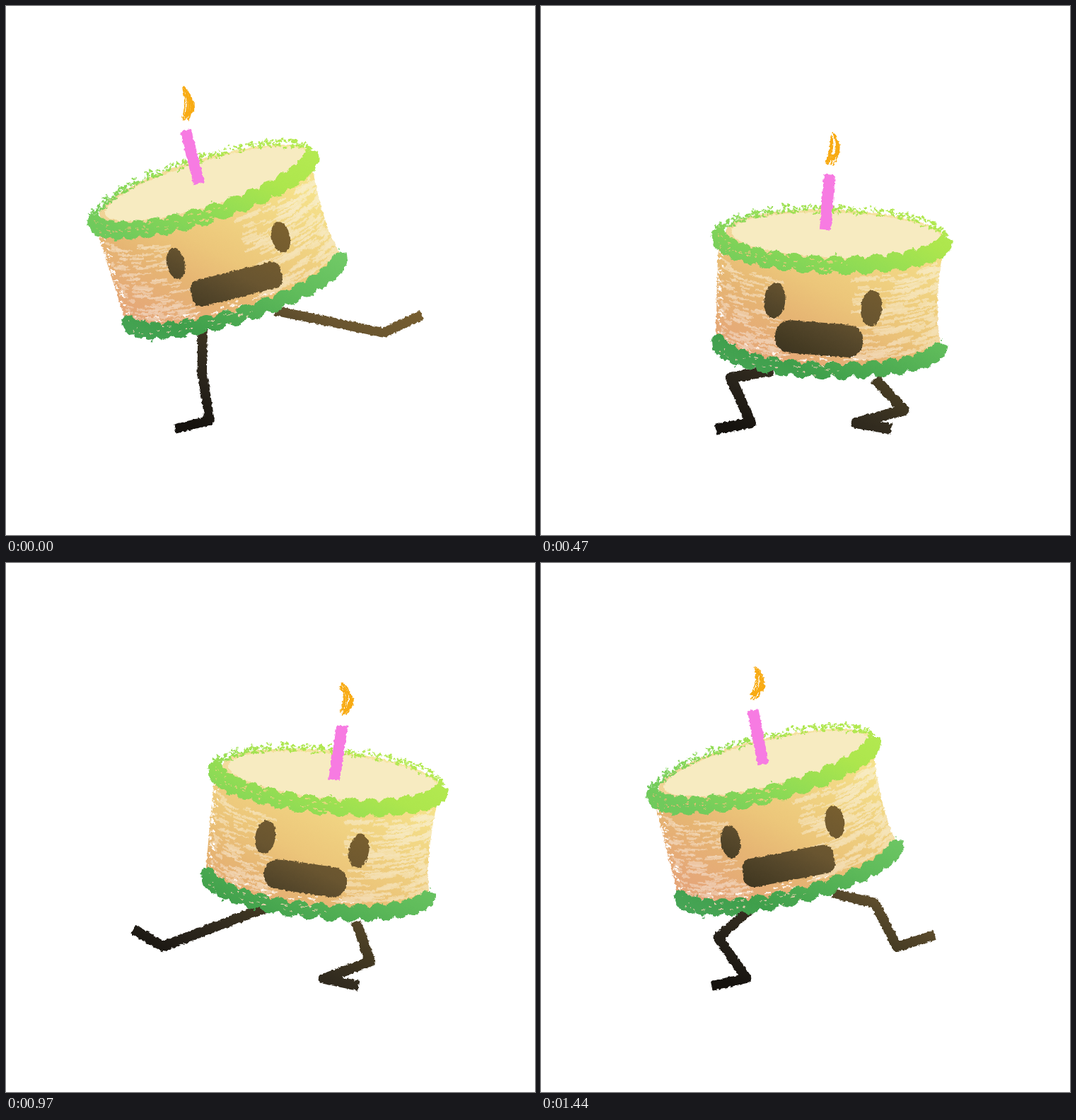
Write an HTML page with a canvas that moves like this. It is 748x748 px and loops after 1540 ms.

```html
<!DOCTYPE html>
<html lang="en">
<head>
<meta charset="utf-8">
<title>Dancing cake</title>
<style>
html, body { margin: 0; height: 100%; overflow: hidden; background: #fff; }
canvas { display: block; width: 100vw; height: 100vh; filter: url(#chalk); }
svg { position: absolute; width: 0; height: 0; }
</style>
</head>
<body>
<canvas id="stage" width="748" height="748"></canvas>
<svg>
  <filter id="chalk" x="0" y="0" width="100%" height="100%" color-interpolation-filters="sRGB">
    <feTurbulence type="fractalNoise" baseFrequency=".22" numOctaves="2" seed="4"/>
    <feDisplacementMap in="SourceGraphic" scale="4.5" xChannelSelector="R" yChannelSelector="G"/>
  </filter>
</svg>
<script>
const g = document.getElementById('stage').getContext('2d');
const { sin, cos, PI, abs, max, sqrt, hypot } = Math;

const LOOP = 1540;
// The dance is one sway: time, then -1 (far left) to 1 (far right)
const SWAY = [[0, -1], [300, 0], [470, .32], [770, 1], [970, .6], [1170, 0], [1440, -.76], [LOOP, -1]];
// Each leg kicks along a curve to a peak, ending with its own foot direction
const LEGS = [
  { side: -1, via: [165, 560], peak: [240, 397], foot: [-37, -48] },
  { side: 1, via: [490, 605], peak: [534, 462], foot: [54, -25] }
];

const mix = (a, b, t) => a + (b - a) * t;
const mixPt = (p, q, t) => [mix(p[0], q[0], t), mix(p[1], q[1], t)];

function sway(t) {
  const i = SWAY.findIndex(key => key[0] > t);
  const [t0, a] = SWAY[i - 1], [t1, b] = SWAY[i];
  return mix(a, b, (t - t0) / (t1 - t0));
}

let seed;
function rand(a = 0, b = 1) {
  seed = (seed * 1664525 + 1013904223) >>> 0;
  return a + (b - a) * seed / 4294967296;
}

// Light stays fixed to the stage: colours run along y - x/2
function light(...stops) {
  const inv = g.getTransform().inverse();
  const at = s => inv.transformPoint({ x: -.4 * s, y: .8 * s });
  const lo = stops[0][0], span = stops[stops.length - 1][0] - lo;
  const a = at(lo), b = at(lo + span);
  const fill = g.createLinearGradient(a.x, a.y, b.x, b.y);
  for (const [s, colour] of stops) fill.addColorStop((s - lo) / span, colour);
  return fill;
}
const ink = () => light([90, '#80642f'], [215, '#695530'], [260, '#54462a'],
  [300, '#443a22'], [345, '#352e20'], [400, '#27221a'], [460, '#15120e']);

function line(pts, width, style) {
  g.strokeStyle = style;
  g.lineWidth = width;
  g.beginPath();
  for (const [x, y] of pts) g.lineTo(x, y);
  g.stroke();
}

function oval(x, y, rx, ry, tilt, style) {
  g.fillStyle = style;
  g.beginPath();
  g.ellipse(x, y, rx, ry, tilt, 0, 2 * PI);
  g.fill();
}

// Point on the cake's side, from its middle: k = 0 is the upper rim, 1 the lower; u < 0 is the far side
function ring(u, k, drop = 0) {
  const x = -(161 - 3 * k) * cos(u);
  return [x - 4 + 8 * k, -75 + 149 * k + 40 * sin(u) - .053 * x + drop];
}

function flecks(n, u0, u1, k0, k1, len, width, style) {
  for (let i = 0; i < n; i++) {
    const u = rand(u0, u1), k = rand(k0, k1), du = rand(.3, 1) * len;
    line([ring(u, k), ring(u + du / 2, k), ring(u + du, k)], rand(.5, 1) * width, style);
  }
}

function icing(k, width, style) {
  const pts = [];
  for (let u = .05; u < PI - .05; u += .02) pts.push(ring(u, k, 4 * sin(34 * u)));
  line(pts, width, style);
  for (let i = 0; i < 90; i++) {
    const u = rand(.05, PI - .05), [x, y] = ring(u, k, 4 * sin(34 * u) + rand(-1, 1) * width * .6);
    line([[x, y], [x + rand(-5, 5), y + rand(-3, 3)]], 2, style);
  }
}

function cake() {
  const crumb = light([50, '#f5e18b'], [200, '#ecc67a'], [260, '#e6b573'], [350, '#e5a679']);
  const cream = light([50, '#f8edc4'], [200, '#f4deb0'], [330, '#efcdb2']);
  const lime = light([-20, '#b5ea52'], [60, '#ade64d'], [150, '#8edb55'], [245, '#70ca5c']);
  const green = light([110, '#72ca67'], [200, '#60bc5b'], [330, '#3f9f4b'], [390, '#47a556']);

  g.save();
  const side = new Path2D('M-164-62Q0-112 155-78Q146 8 161 66Q110 110 10 116Q-100 111-156 80Q-161 8-164-62Z');
  g.fillStyle = crumb;
  g.fill(side);
  g.clip(side);
  g.globalAlpha = .75;
  flecks(230, 1.75, 3.1, .12, .9, .3, 4, cream);
  flecks(120, .25, 1.05, .15, .9, .2, 3.5, cream);
  flecks(50, .5, 1.15, .78, .92, .12, 3, cream);
  g.globalAlpha = 1;
  flecks(50, .02, .3, .1, .95, .1, 2.4, '#fff');
  flecks(40, .35, 2, .86, .95, .05, 2, '#fff6ee');
  g.restore();

  oval(0, -77.5, 155, 36, -.045, light([-20, '#f7e7a2'], [260, '#efd095']));
  oval(2, -78, 149, 32, -.045, '#f7ebc1');

  for (let i = 0; i < 330; i++) {
    const u = rand(-PI, 0), [x, y] = ring(u, 0, 2 * sin(34 * u) + rand(-5, 5));
    line([[x, y], [x + rand(-6, 6), y + rand(-4, 4)]], 2.2, lime);
  }
  icing(0, 20, lime);
  flecks(55, .1, 1.8, -.06, .07, .04, 1.5, crumb);
  icing(1, 18, green);
  flecks(35, .1, 1.7, .94, 1.05, .04, 1.5, cream);
}

// The features slide a little against the sway and shrink at its ends
function face(s) {
  const far = abs(s), fill = ink();
  for (const x of [-75 - 8 * s, 66 - 20 * s])
    oval(x, 21, 16 - 3 * far, 27 - 5 * far, .02, fill);
  const w = 131 - 21 * max(0, s), h = 50 - 12 * far;
  g.fillStyle = fill;
  g.beginPath();
  g.roundRect(-6 - 15 * s - w / 2, 70 - h / 2, w, h, h * (.42 + .1 * s));
  g.fill();
}

function streaks(a, b, c, n, width) {
  g.strokeStyle = '#f8ab14';
  for (let i = 0; i < n; i++) {
    const d = rand(-.5, .5) * width;
    g.lineWidth = rand(1.2, 2.4);
    g.beginPath();
    g.moveTo(a[0] + d * .4, a[1] + rand(0, 12));
    g.quadraticCurveTo(b[0] + d * 2, b[1], c[0] + d, c[1] - rand(0, 8));
    g.stroke();
  }
}

// The candle drifts over the top once a loop; its flame stays upright
function candle(t, tilt) {
  const x = -5 + 11 * cos(2 * PI * (t - 1100) / LOOP), y = -76 + .6 * x;
  line([[x, y], [x, y - 78]], 16, '#f77be2');
  g.translate(x, y - 78);
  g.rotate(-tilt);
  seed = t + 11;
  const bend = rand(8, 18), tip = rand(-5, 5);
  streaks([tip, -62], [bend, -42], [0, -13], 10, 10);
  streaks([bend, -42], [bend, -24], [0, -20], 4, 5);
}

function leg({ side, via, peak, foot }, s, hip) {
  const far = sqrt(abs(s));
  let ankle = [371 + side * (63 + 20 * far), 594 - 8 * far];
  let toe = [371 + side * (114 + 18 * far), 598];
  const kick = max(0, (-side * s - .32) / .68);
  if (kick) {
    const step = mixPt([toe[0] - ankle[0], toe[1] - ankle[1]], foot, kick ** .6);
    ankle = mixPt(mixPt(ankle, via, kick), mixPt(via, peak, kick), kick);
    toe = [ankle[0] + step[0], ankle[1] + step[1]];
  }
  // knee of a thigh of 60 and a shin of 70, bent outwards; a longer reach is straight
  const dx = ankle[0] - hip.x, dy = ankle[1] - hip.y, d = hypot(dx, dy);
  const along = d > 130 ? d * .46 : (d * d + 60 ** 2 - 70 ** 2) / (2 * d);
  const out = d > 130 ? 0 : side * sqrt(max(0, 60 ** 2 - along ** 2));
  const knee = [hip.x + (dx * along + dy * out) / d, hip.y + (dy * along - dx * out) / d];
  line([[hip.x, hip.y], knee, ankle, toe], 17 - 3.5 * far, ink());
}

function draw(t) {
  const s = sway(t), far = abs(s), tilt = s * 14.2 * PI / 180;
  const x = 370 + (s > 0 ? 138 * s ** 1.1 : -70 * far ** 2.2);
  const y = 412.5 - 85 * far ** 1.8;
  const pose = new DOMMatrix().translate(x, y).rotate(s * 14.2);
  seed = 7;
  g.clearRect(0, 0, 748, 748);
  g.lineJoin = 'round';
  for (const l of LEGS)
    leg(l, s, pose.transformPoint({ x: l.side * (82 - 29 * far), y: 120 }));
  g.save();
  g.setTransform(pose);
  cake();
  face(s);
  candle(t, tilt);
  g.restore();
}

// Poses hold for 100 ms, and 170 ms when the cake stands upright
function poseStart(t) {
  let at = 0, hold;
  while (at + (hold = sway(at) ? 100 : 170) <= t) at += hold;
  return at;
}

let shown, start;
function tick(now) {
  start ??= now;
  const t = poseStart((now - start) % LOOP);
  if (t !== shown) draw(shown = t);
  requestAnimationFrame(tick);
}
draw(0);
requestAnimationFrame(tick);
</script>
</body>
</html>
```
